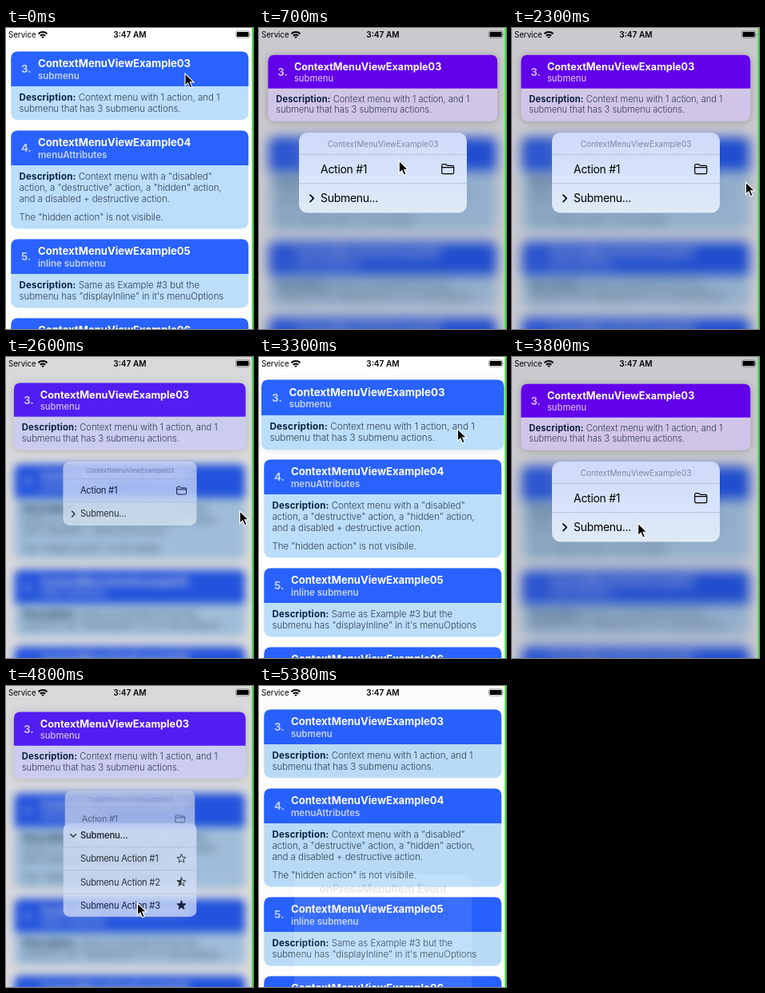
Animation, 309 px wide and 377 px high, one loop 5.56 s. Source, as an HTML page:

```html
<!DOCTYPE html>
<html lang="en">
<head>
<meta charset="utf-8">
<title>Context menu demo</title>
<style>
  html, body { margin: 0; width: 100%; height: 100%; overflow: hidden; background: #fff; }
  svg { display: block; width: 309px; height: 377px; font-family: Inter, Roboto, sans-serif; --open: 0; }
  .head { fill: #2962ff; }
  .body { fill: #bbdefb; }
  #preview .head { fill: color-mix(in srgb, #6200ea calc(var(--open) * 100%), #2962ff); }
  #preview .body { fill: color-mix(in srgb, #d1c4e9 calc(var(--open) * 100%), #bbdefb); }
  #preview .subtitle { font-weight: calc(600 - 100 * var(--open)); }
  .title { font-size: 13.1px; font-weight: 700; fill: #fff; }
  .number { font-size: 13.2px; font-weight: 700; fill: #fff; opacity: .72; }
  .subtitle { font-size: 11.5px; font-weight: 600; fill: #fff; opacity: .72; }
  .copy { font-size: 11.5px; font-weight: 300; letter-spacing: -.04px; fill: #303f50; }
  .copy .lead { font-weight: 700; letter-spacing: .18px; fill: #0b2340; }
  .status { font-size: 10.1px; }
  .item { font-size: 14px; letter-spacing: -.28px; }
  .caption { font-size: 9.95px; fill: #7f879b; text-anchor: middle; }
  .rule { stroke: #3c3c43; stroke-opacity: .25; stroke-width: .8; }
  .line { fill: none; stroke: #000; stroke-width: 1.2; stroke-linejoin: round; stroke-linecap: round; }
  .alert { text-anchor: middle; }
</style>
</head>
<body>
<svg id="stage" viewBox="0 0 309 377">
  <defs>
    <linearGradient id="glass" x2="0" y2="1">
      <stop offset="0" stop-color="#cfd9f9"/>
      <stop offset=".5" stop-color="#d6e3fb"/>
      <stop offset="1" stop-color="#dfeaf5"/>
    </linearGradient>
    <linearGradient id="subGlass" x2="0" y2="1">
      <stop offset="0" stop-color="#e4ebfc"/>
      <stop offset=".4" stop-color="#d5e0fa"/>
      <stop offset="1" stop-color="#d7e3f9"/>
    </linearGradient>
    <clipPath id="subClip"><rect id="subBox" x="50" width="210" rx="10.5"/></clipPath>
  </defs>
  <rect width="309" height="377" fill="#fff"/>
  <g id="list"></g>
  <rect id="dim" width="309" height="377" fill="#00001a"/>
  <g class="status">
    <text x="3" y="12" font-size="9.7">Service</text>
    <text x="154.9" y="12.2" font-weight="600" text-anchor="middle">3:47 AM</text>
    <g fill="none" stroke="#000" stroke-width="2">
      <path d="M40.5 7.3a8 8 0 0 1 11 0M42.8 9.8a4.8 4.8 0 0 1 6.4 0"/>
      <path d="M46 13l-1.7-1.8a2.5 2.5 0 0 1 3.4 0z" fill="#000" stroke="none"/>
    </g>
    <rect x="287.6" y="3.8" width="17" height="8.4" rx="2.2" fill="none" stroke="#000" stroke-opacity=".45" stroke-width=".8"/>
    <rect x="288.7" y="4.9" width="14.8" height="6.2" rx="1.2"/>
    <path d="M305.6 6.6q1.3 1.4 0 2.8z" opacity=".5"/>
  </g>
  <g id="preview"></g>
  <g id="menu">
    <g id="parent">
      <rect x="50" y="131" width="210" height="100.5" rx="10.5" fill="url(#glass)"/>
      <rect id="shade" x="50" y="131" width="210" height="100.5" rx="10.5"/>
      <g id="parentItems">
        <text class="caption" x="155" y="149">ContextMenuViewExample03</text>
        <path class="rule" d="M50 158.3h210M50 194.7h210"/>
        <text class="item" x="77" y="181.6">Action #1</text>
        <path class="line" d="M228.7 181v-8.6q0-1.7 1.7-1.7h3.4l1.8 1.7h6.4q1.7 0 1.7 1.7v6.9q0 1.6-1.7 1.6h-11.6q-1.7 0-1.7-1.6zM228.7 174.7h15"/>
      </g>
    </g>
    <g id="sub" clip-path="url(#subClip)">
      <rect id="subFill" x="50" y="182.5" width="210" height="147" fill="url(#subGlass)"/>
      <g id="subHead">
        <path id="chevron" class="line" d="M-2-4.3L2.3 0L-2 4.3" style="stroke-width: 1.7"/>
        <text id="subTitle" class="item" x="77" y="206.5">Submenu...</text>
      </g>
      <g id="subItems"></g>
    </g>
  </g>
  <g id="alert">
    <rect width="309" height="377" opacity=".2"/>
    <rect x="44" y="236" width="222" height="196" rx="11.5" fill="#f6f7f9"/>
    <g class="alert">
      <text class="item" x="155" y="259" font-weight="600">onPressMenuItem Event</text>
      <text class="copy" x="155" y="277">actionKey: submenu-action-2</text>
      <text class="copy" x="155" y="292">actionTitle: Submenu Action #2</text>
    </g>
  </g>
  <path id="cursor" d="M0 0v15.2l3.5-3.3 2.5 5.9 2.7-1.1-2.5-5.8h4.9z" fill="#000" stroke="#fff" stroke-width="1.1"/>
  <rect x="307.6" width="1.4" height="377" fill="#10f810"/>
</svg>
<script>
const LOOP = 5560;
const SECOND_ROUND = 3000;
const HEAD = 43.5, LINE = 14.2, PARAGRAPH_GAP = 8.8, CARD_GAP = 13.1;
const $ = id => document.getElementById(id);

// An empty line separates paragraphs.
function card(top, number, subtitle, lines) {
  let y = top + HEAD + 17.7;
  const copy = lines.map((text, i) => {
    const lead = i ? '' : '<tspan class="lead">Description:</tspan> ';
    const row = `<text class="copy" x="16.5" y="${y}">${lead}${text}</text>`;
    y += text ? LINE : PARAGRAPH_GAP;
    return row;
  }).join('');
  const bottom = y - 3.7;
  const markup = `<rect class="body" x="6.3" y="${top}" width="297" height="${bottom - top}" rx="8.5"/>
    <path class="head" d="M6.3 ${top + HEAD}v-35q0-8.5 8.5-8.5h280q8.5 0 8.5 8.5v35z"/>
    <text class="number" x="19" y="${top + 26.8}">${number}.</text>
    <text class="title" x="40" y="${top + 19.8}">ContextMenuViewExample0${number}</text>
    <text class="subtitle" x="40" y="${top + 34.2}">${subtitle}</text>${copy}`;
  return { markup, bottom };
}

function star(y, fill) {
  const points = Array.from({ length: 10 }, (_, i) => {
    const r = i % 2 ? 3.1 : 7.4, a = i * Math.PI / 5;
    return [236 + r * Math.sin(a), y - r * Math.cos(a)];
  });
  const filled = fill === 1 ? points : fill ? [points[0], ...points.slice(5)] : [];
  return `<polygon points="${filled.join(' ')}"/><polygon class="line" points="${points.join(' ')}"/>`;
}

let nextTop = 29.4;
[
  ['submenu', 'Context menu with 1 action, and 1', 'submenu that has 3 submenu actions.'],
  ['menuAttributes', 'Context menu with a "disabled"', 'action, a "destructive" action, a "hidden" action,',
    'and a disabled + destructive action.', '', 'The "hidden action" is not visibile.'],
  ['inline submenu', 'Same as Example #3 but the', 'submenu has "displayInline" in it\'s menuOptions'],
  ['async items', 'Context menu with', 'more items.']
].forEach(([subtitle, ...lines], i) => {
  const { markup, bottom } = card(nextTop, i + 3, subtitle, lines);
  $(i ? 'list' : 'preview').innerHTML += markup;
  nextTop = bottom + CARD_GAP;
});

$('subItems').innerHTML = [0, .5, 1].map((fill, i) => {
  const y = 238.2 + i * 36.7;
  return `<path class="rule" d="M50 ${y - 18.5}h210"/>
    <text class="item" x="77" y="${y + 5}">Submenu Action #${i + 1}</text>${star(y, fill)}`;
}).join('');

// Eased 0 to 1 between two times.
function ramp(t, from, to) {
  const p = Math.min(1, Math.max(0, (t - from) / (to - from)));
  return p * p * (3 - 2 * p);
}
const set = (id, attrs) => Object.entries(attrs).forEach(([k, v]) => $(id).setAttribute(k, v));
const scaleAt = (s, x, y) => `translate(${x} ${y}) scale(${s}) translate(${-x} ${-y})`;

// The pointer glides from stop to stop.
const home = { x: 224, y: 57 };
const row = { x: 155, y: 212 };
const glides = [
  { from: 450, to: 840, ...row },
  { from: 1050, to: 1400, x: 164.5, y: 207.5 },
  { from: 1850, to: 2300, x: 292.5, y: 193 },
  { from: 2600, to: 3050, x: 248.5, y: 90 },
  { from: 3450, to: 3840, ...row },
  { from: 4200, to: 4500, x: 164.5, y: 272 },
  { from: 4900, to: 5200, x: 160, y: 390 }
];
const pointerAt = t => glides.reduce((at, stop) => {
  const p = ramp(t, stop.from, stop.to);
  return { x: at.x + (stop.x - at.x) * p, y: at.y + (stop.y - at.y) * p };
}, home);

// 100 ms steps, with two longer holds at the end.
const snap = t => t < 5380 ? Math.min(5200, Math.floor(t / 100) * 100) : 5380;

function draw(t) {
  // Both rounds press, open the menu and its submenu; only the first folds it again.
  const again = t >= SECOND_ROUND;
  const u = again ? t - SECOND_ROUND : t;
  const dismiss = again ? 1700 : 2500;
  const lift = ramp(u, 100, 300) - ramp(u, 300, 500);
  const open = ramp(u, 300, 600) - ramp(u, dismiss, dismiss + 280);
  const sub = ramp(u, 950, 1300) - (again ? 0 : ramp(u, 1700, 2000));
  const alert = ramp(t, 4900, 5050) - ramp(t, 5200, 5420);
  const pointer = pointerAt(t);

  $('list').style.filter = open ? `blur(${8 * open}px)` : 'none';
  set('list', { transform: scaleAt(1 - .04 * open, 155, 335) });
  set('dim', { opacity: .21 * open });

  const preview = $('preview');
  preview.style.setProperty('--open', open);
  preview.style.filter = open + lift
    ? `drop-shadow(0 1px 5px rgba(0,0,0,${.22 * open + .1 * lift}))` : 'none';
  set('preview', { transform: `translate(0 ${2.8 * open}) ${scaleAt(1 + .022 * lift - .034 * open, 154.8, 72.5)}` });

  set('menu', { opacity: open, transform: scaleAt(.3 + .7 * open, 155, 131) });
  set('parent', { transform: scaleAt(1 - .028 * sub, 155, 131) });
  set('shade', { opacity: .07 * sub });
  set('parentItems', { opacity: 1 - .45 * sub });
  set('subBox', { y: 194.7 - 12.2 * sub, height: 36.8 + 110.2 * sub });
  set('subFill', { opacity: Math.min(1, sub * 3) });
  set('subHead', { transform: `translate(0 ${11.8 * (1 - sub)})` });
  set('chevron', { transform: `translate(66 201.6) rotate(${90 * sub})` });
  set('subTitle', { 'font-weight': sub > .5 ? 600 : 400 });
  set('subItems', { opacity: sub });

  set('alert', { opacity: alert });
  set('cursor', { transform: `translate(${pointer.x} ${pointer.y})` });
}

const start = performance.now();
function tick() {
  draw(snap((performance.now() - start) % LOOP));
  requestAnimationFrame(tick);
}
tick();
</script>
</body>
</html>
```
